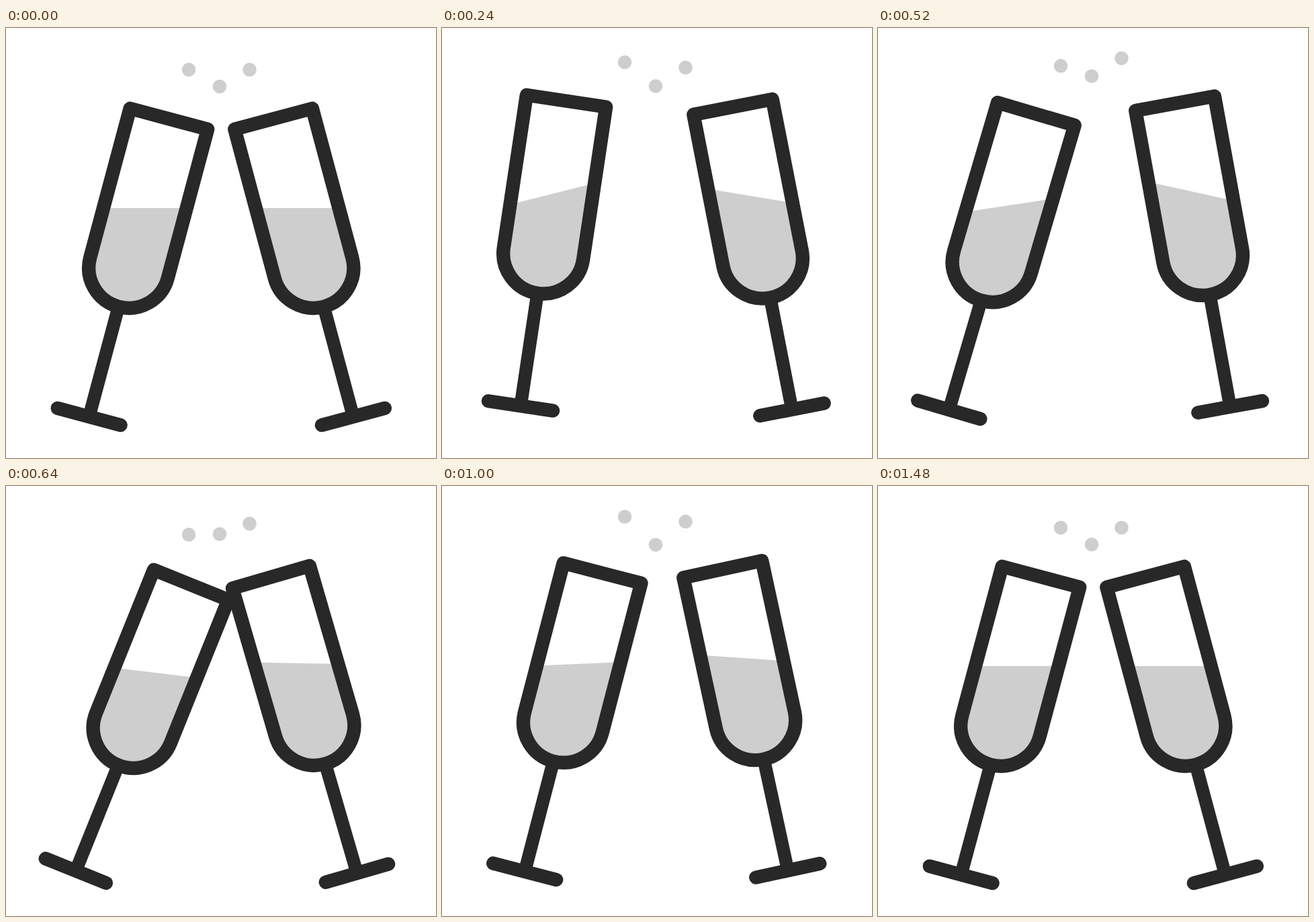
Animation of 640 by 640 pixels, one loop 2.04 s. Source, as an HTML page:

```html
<!DOCTYPE html>
<html lang="en">
<head>
<meta charset="utf-8">
<title>Cheers</title>
<style>
  html, body { margin: 0; width: 100%; height: 100%; overflow: hidden; background: #fff; }
  svg { display: block; width: 100%; height: 100%; }
  .line { fill: none; stroke: #282828; stroke-width: 20.4; stroke-linecap: round; stroke-linejoin: round; }
  .stem { stroke-width: 19.4; stroke-linecap: butt; }
  .soft { fill: #cecece; }
</style>
</head>
<body>
<svg viewBox="0 0 640 640">
  <defs>
    <path id="bowl" d="M-59.8 0V-229.6H59.8V0A59.8 59.8 0 0 1 -59.8 0Z"/>
    <clipPath id="inside"><use href="#bowl"/></clipPath>
  </defs>
  <g id="scene"></g>
</svg>
<script>
const LOOP = 2040, STEP = 40;
const SWING = [0, 400, 600, 840, 1120];        // rest, draw back, clink, bounce, rest
const SLOSH = [...SWING, 1440];
const BOB = [0, 400, 680, 960, 1280];
const scene = document.getElementById('scene');

function add(parent, tag, attrs) {
  const el = document.createElementNS('http://www.w3.org/2000/svg', tag);
  for (const key in attrs) el.setAttribute(key, attrs[key]);
  return parent.appendChild(el);
}

const clamp = v => Math.min(1, Math.max(0, v));
const ease = p => p * p * (3 - 2 * p);

// Ease from value to value on the given beats and end where it began.
function sway(beats, values, t) {
  const last = beats.length - 1;
  if (t <= 0 || t >= beats[last]) return values[0];
  const i = beats.findIndex(b => b > t) - 1;
  const from = values[i], to = i + 1 < last ? values[i + 1] : values[0];
  return from + (to - from) * ease((t - beats[i]) / (beats[i + 1] - beats[i]));
}

// x, y: bowl centre; surface: liquid angle inside the glass; lift: change of level that fades out
const glasses = [
  { flip: 1, delay: 0, lift: -4.5,
    x: [183, 133.6, 190.5, 177.5], y: [357, 324.1, 361.3, 344], tilt: [15, 5, 22.6, 13.9],
    surface: [-15, -30.4, -15.1, -22, -9.5] },
  { flip: -1, delay: 40, lift: 5,
    x: [457.5, 496.5, 458.5, 472], y: [357, 328.5, 356, 342.5], tilt: [15, 7.1, 16.2, 10.4],
    surface: [-15, -25.7, -17.3, -23, -5.6] }
];

const bubbles = [
  { x: 272, y: 62, delay: 0, drop: 12 },
  { x: 318, y: 87, delay: 200, drop: 12 },
  { x: 362.5, y: 62, delay: 130, drop: 15.5 }
];

for (const b of bubbles) b.el = add(scene, 'circle', { class: 'soft', cx: b.x, r: 10.3 });

for (const g of glasses) {
  g.el = add(scene, 'g', {});
  const clip = add(g.el, 'g', { 'clip-path': 'url(#inside)' });
  g.liquid = add(clip, 'path', { class: 'soft' });
  add(g.el, 'path', { class: 'line stem', d: 'M0 60V229.3' });
  add(g.el, 'path', { class: 'line', d: 'M-48.6 229.3H48.6' });
  add(g.el, 'use', { class: 'line', href: '#bowl' });
}

function drawGlass(g, t) {
  const [x, y, tilt] = [g.x, g.y, g.tilt].map(v => sway(SWING, v, t - g.delay));
  g.el.setAttribute('transform', `translate(${x} ${y}) scale(${g.flip} 1) rotate(${tilt})`);

  const wet = t - 40;
  const level = -92.1 - g.lift * ease(clamp(wet / 400)) * clamp((1440 - wet) / 1040);
  const rise = 70 * Math.tan(sway(SLOSH, g.surface, wet) * Math.PI / 180);
  g.liquid.setAttribute('d', `M-70 ${level - rise}L70 ${level + rise}V70H-70Z`);
}

function draw(t) {
  for (const b of bubbles) b.el.setAttribute('cy', b.y + sway(BOB, [0, -17, b.drop, -17], t - b.delay));
  for (const g of glasses) drawGlass(g, t);
}

const start = performance.now();
function tick() {
  const t = (performance.now() - start) % LOOP;
  draw(Math.floor(t / STEP) * STEP);
  requestAnimationFrame(tick);
}
tick();
</script>
</body>
</html>
```
